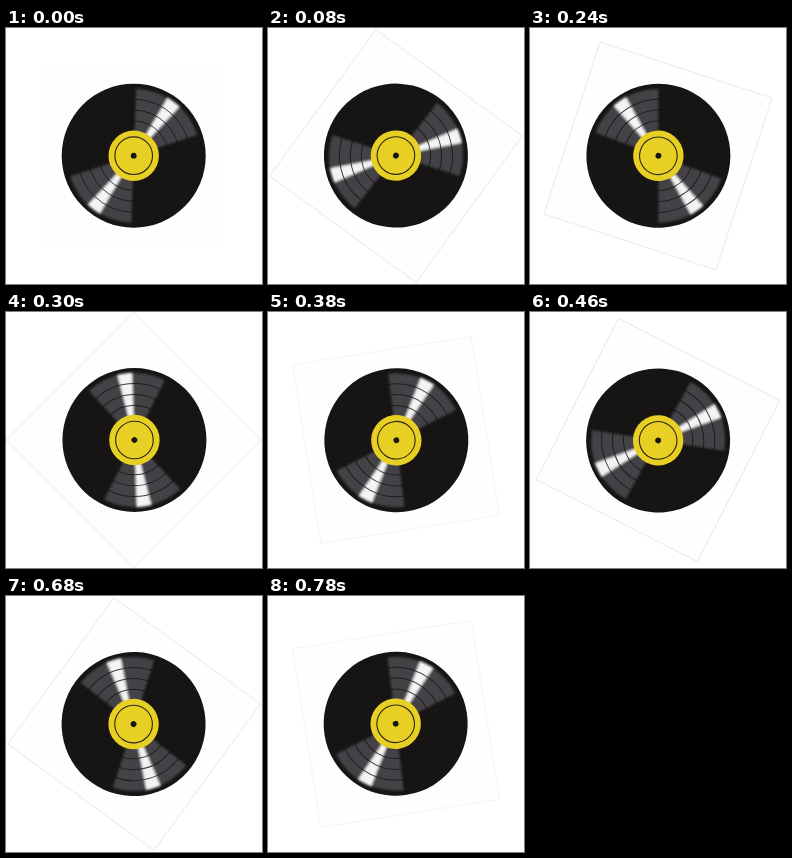
These frames come from a looping animation (256x256 px, 0.8 s). An HTML page:

```html
<!DOCTYPE html>
<html lang="en">
<head>
<meta charset="utf-8">
<title>Spinning record</title>
<style>
  html, body { margin: 0; width: 100%; height: 100%; overflow: hidden; background: #fff; }
  svg { display: block; width: 100vw; height: 100vh; }
</style>
</head>
<body>
<svg viewBox="-128 -128 256 256">
  <defs>
    <filter id="soft" x="-20%" y="-20%" width="140%" height="140%">
      <feGaussianBlur stdDeviation="1"/>
    </filter>
    <g id="shine" filter="url(#soft)">
      <path d="M0 0L-37.9-55.3A67 67 0 0 1 38.8-54.6Z" fill="#444346"/>
      <path d="M0 0L-7.2-66.9A67.3 67.3 0 0 1 7.6-66.9Z" fill="#f4f4f4"/>
    </g>
  </defs>
  <g id="spinner">
    <rect id="sheet" x="-90.5" y="-90.5" width="181" height="181" fill="#fefefe" stroke="#e4e4e4" stroke-width=".8"/>
    <!-- The record sits slightly off the axis -->
    <g transform="translate(-.3 -.3)">
      <circle r="72" fill="#161513"/>
      <use href="#shine" transform="rotate(36.5)"/>
      <use href="#shine" transform="rotate(216.5)"/>
      <g fill="none" stroke="#161513" stroke-opacity=".8">
        <circle r="34.7"/><circle r="45.6"/><circle r="56.5"/>
      </g>
      <circle r="25.2" fill="#e8cf24"/>
      <circle r="18.8" fill="none" stroke="#2a2610" stroke-width="1.1"/>
      <circle r="2.9" fill="#161513"/>
    </g>
  </g>
</svg>
<script>
  const LOOP = 800, STEP = 20;
  const spinner = document.getElementById('spinner');
  const sheet = document.getElementById('sheet');

  function draw() {
    const time = Math.floor(performance.now() % LOOP / STEP) * STEP;
    const angle = 360 * time / LOOP;
    spinner.setAttribute('transform', `rotate(${angle})`);
    // The sheet's edge vanishes when it lies square to the stage
    const tilt = Math.abs(Math.sin(angle * Math.PI / 90));
    sheet.setAttribute('stroke-opacity', Math.min(1, tilt * 1.5));
    requestAnimationFrame(draw);
  }
  draw();
</script>
</body>
</html>
```
